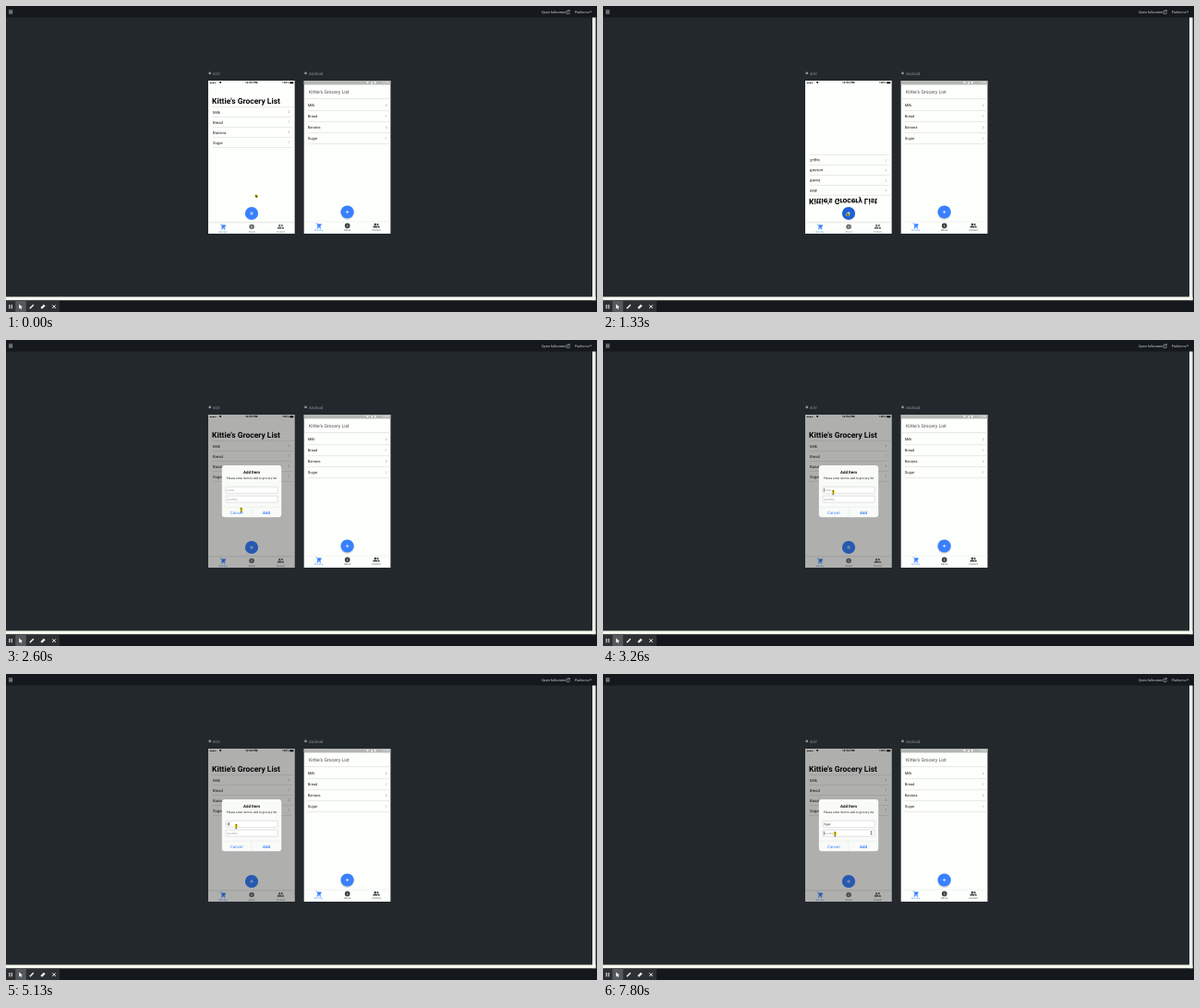
Write an HTML page that moves like this. It is 640 px wide and 332 px high and loops after 8 s.

```html
<!DOCTYPE html>
<html lang="en">
<head>
<meta charset="utf-8">
<title>Grocery list preview</title>
<style>
  html, body { margin: 0; width: 100%; height: 100%; overflow: hidden; background: #23282d; }
  svg { display: block; width: 100vw; height: 100vh; }
  text { font-family: Roboto, "Open Sans", sans-serif; text-rendering: geometricPrecision; }
</style>
</head>
<body>
<svg id="stage" viewBox="0 0 640 332" xmlns="http://www.w3.org/2000/svg">
  <defs>
    <g id="cart">
      <path d="M-3-2.6h1.2l.5 1h4.4l-1.3 2.6h-2.7l-.5.8h4.2" fill="none" stroke="currentColor" stroke-width=".6"/>
      <path d="M-1.4-1.7h4.4l-1.4 2.7h-2.6z" fill="currentColor"/>
      <circle cx="-1.1" cy="2.6" r=".65" fill="currentColor"/>
      <circle cx="1.8" cy="2.6" r=".65" fill="currentColor"/>
    </g>
    <g id="info">
      <circle r="2.8" fill="currentColor"/>
      <path d="M0-.4v1.9M0-1.6v.7" stroke="#fff" stroke-width=".6"/>
    </g>
    <g id="people" fill="currentColor">
      <circle cx="-1.2" cy="-1.4" r="1.2"/><circle cx="1.5" cy="-1.4" r="1.1"/>
      <path d="M-3.6 2.2v-.8q0-1.3 2.4-1.3t2.4 1.3v.8zM1.6 2.2v-1q0-.6-.5-1q2.6-.2 2.6 1.2v.8z"/>
    </g>
  </defs>

  <rect width="640" height="332" fill="#23282d"/>
  <rect width="640" height="12.5" fill="#15191e"/>
  <path d="M3 4.8h4.2M3 6.4h4.2M3 8h4.2" stroke="#d5d8da" stroke-width=".7"/>
  <g id="links" fill="#cdd1d4"></g>
  <g fill="none" stroke="#cdd1d4" stroke-width=".5">
    <path d="M608.4 5.2h-1.4v3.2h3.1v-1.5M608.5 4.6h1.8v1.8M610.2 4.7l-2 2"/>
  </g>
  <path d="M632 5.8h2.2l-1.1 1.2z" fill="#cdd1d4"/>

  <rect x="635" y="12.5" width="3.5" height="307" fill="#f3f6f0"/>
  <rect y="315.5" width="638.5" height="4" fill="#f5f8ee"/>
  <rect x="635.4" y="13" width="2.7" height="300" fill="#e9ece8"/>
  <rect y="319.5" width="640" height="12.5" fill="#14181d"/>
  <rect y="320" width="58" height="12" fill="#2d3033"/>
  <rect x="10.3" y="320" width="11.4" height="12" fill="#575a5c"/>
  <g stroke="#f4f4f4" fill="none" stroke-width="1">
    <path d="M3.8 324v4.4M6.2 324v4.4"/>
    <path d="M25.8 328.2l4-4" stroke-width="1.5"/>
    <path d="M38.2 328l3.6-3.4" stroke-width="2.4"/>
    <path d="M50.2 324.4l3.6 3.6M53.8 324.4l-3.6 3.6"/>
  </g>
  <path d="M14.2 323.4v5l1.2-1 .8 1.7.9-.4-.8-1.7h1.6z" fill="#fff"/>

  <g id="labels" fill="#8b9197">
    <circle cx="220.8" cy="72.9" r="1.4"/>
    <circle cx="324.5" cy="72.9" r="1.4"/>
  </g>

  <g id="droid">
    <rect x="322.7" y="81" width="93.7" height="166" fill="#fdfffc"/>
    <rect x="322.7" y="81" width="93.7" height="4.4" fill="#b4b7b3"/>
    <path d="M390 82.3h3l-1.5 2zM397 82v2.3h-2.4zM399 82h1.3v2.3h-1.3z" fill="#fff"/>
    <path d="M322.7 100.6h93.7" stroke="#d6d8d5" stroke-width=".6"/>
  </g>

  <clipPath id="screen"><rect x="219" y="81" width="93.8" height="166"/></clipPath>
  <g id="phone" clip-path="url(#screen)">
    <rect x="219" y="81" width="93.8" height="166" fill="#fdfffc"/>
    <g id="list"></g>
    <g id="bar">
      <circle cx="221.3" cy="83.3" r=".65"/><circle cx="222.9" cy="83.3" r=".65"/>
      <circle cx="224.5" cy="83.3" r=".65"/><circle cx="226.1" cy="83.3" r=".65"/>
      <circle cx="227.7" cy="83.3" r=".5" fill="#888"/>
      <path d="M230.8 82.6q1.3-1.1 2.6 0l-1.3 1.7z"/>
      <rect x="307.3" y="82.2" width="4" height="2" rx=".4"/>
    </g>
    <path d="M219 234.8h93.8" stroke="#c9cbc8" stroke-width=".5"/>
    <g id="tabs"></g>
    <circle id="fab" cx="266" cy="225" r="7.1" fill="#3880ff"/>
    <path d="M264 225h4M266 223v4" stroke="#fff" stroke-width=".65"/>
    <rect id="shade" x="219" y="81" width="93.8" height="166" fill="#000"/>
    <g id="dialog">
      <rect x="233.8" y="136" width="64.4" height="56.3" rx="3.2" fill="#f9fbf8"/>
      <g fill="#fff" stroke="#c4c6c4" stroke-width=".5">
        <rect x="238" y="159.3" width="56.2" height="7" rx=".8"/>
        <rect x="238" y="169.2" width="56.2" height="7" rx=".8"/>
      </g>
      <path d="M233.8 181.3h64.4M266 181.3v11" stroke="#dcdedb" stroke-width=".4"/>
      <path id="spin" d="M289.5 172.1h2.2l-1.1-1.5zM289.5 173.1h2.2l-1.1 1.5z" fill="#333"/>
      <path id="caret" stroke="#111" stroke-width=".5"/>
    </g>
  </g>

  <g id="cursor">
    <circle r="1.9" cx=".2" cy=".2" fill="#f2e400" opacity=".9"/>
    <path id="arrow" d="M-.8-1.6v3.6l.9-.8.6 1.3.6-.3-.6-1.2h1.2z" fill="#222" stroke="#fff" stroke-width=".2"/>
    <path id="beam" d="M-.8-1.3h1.8M.1-1.3v4.4M-.8 3.1h1.8" stroke="#222" stroke-width=".55" fill="none"/>
  </g>
</svg>
<script>
const LOOP = 8000;
const $ = id => document.getElementById(id);

function add(parent, tag, attrs) {
  const el = document.createElementNS("http://www.w3.org/2000/svg", tag);
  for (const k in attrs) el.setAttribute(k, attrs[k]);
  return $(parent).appendChild(el);
}
function text(parent, str, x, y, size, attrs = {}) {
  const el = add(parent, "text", { x, y, "font-size": size, ...attrs });
  el.textContent = str;
  return el;
}

const middle = { "text-anchor": "middle" };
const title = "Kittie's Grocery List";
const items = [["Milk", 2], ["Bread", 1], ["Banana", 3], ["Sugar", 1]];

text("links", "Open fullscreen", 580, 7.9, 3.75);
text("links", "Platforms", 615.7, 7.9, 3.6);
text("links", "Fennora", 570.2, 327.1, 3.4);
text("links", "Documentation", 584, 327.1, 3.6);
text("links", "Forum", 611, 327.1, 3.6);
text("links", "Tolvix", 624.5, 327.1, 3.6);
text("labels", "nUV", 223.8, 74.8, 4.4);
text("labels", "Android", 328, 74.8, 4.4);

function rows(parent, left, right, top, step, size, end) {
  items.forEach(([name, count], i) => {
    const y = top + i * step;
    text(parent, name, left, y + 1.5, size, { fill: "#222" });
    text(parent, count, right, y + 1.3, 3.4, { fill: "#888", ...middle });
    add(parent, "path", { d: `M${left - .4} ${y + step / 2}H${end}`, stroke: "#d2d4d1", "stroke-width": .5 });
  });
}
function tabs(parent, left, y, labelY, rest) {
  [["cart", "Grocery"], ["info", "About"], ["people", "Contact"]].forEach(([icon, name], i) => {
    const x = left + i * 31.3, color = i ? rest : "#3880ff";
    add(parent, "use", { href: "#" + icon, transform: `translate(${x} ${y})`, color });
    text(parent, name, x, labelY, 2.7, { fill: color, ...middle });
  });
}

text("list", title, 223, 106.1, 8.5, { "font-weight": 700, fill: "#050505" });
add("list", "path", { d: "M222.9 109.6H312.8", stroke: "#d2d4d1", "stroke-width": .5 });
rows("list", 224, 306.5, 115, 11, 4.25, 310);
const clock = text("bar", "", 265.8, 84.4, 3.1, { "font-weight": 700, ...middle });
text("bar", "100%", 306.4, 84.4, 3, { "text-anchor": "end", "font-weight": 500 });
tabs("tabs", 234.8, 239.5, 245.5, "#6b6e70");

text("droid", title, 328, 94.6, 5.15, { fill: "#4a4c4d" });
text("droid", "12:53", 415, 84.3, 2.9, { "text-anchor": "end", fill: "#fff" });
rows("droid", 326.8, 411.6, 107.6, 12, 4.1, 416.4);
add("droid", "path", { d: "M322.7 234H416.4", stroke: "#e3e5e2", "stroke-width": .5 });
tabs("droid", 338.4, 238.4, 243.8, "#3c3f41");
add("droid", "circle", { cx: 369.6, cy: 224.5, r: 7.5, fill: "#000", opacity: .15 });
add("droid", "circle", { cx: 369.6, cy: 223.5, r: 7.1, fill: "#3880ff" });
add("droid", "path", { d: "M367.8 223.5h3.6M369.6 221.7v3.6", stroke: "#fff", "stroke-width": .65 });

text("dialog", "Add Item", 266, 145.1, 4.4, { "font-weight": 700, fill: "#111", ...middle });
text("dialog", "Please enter item to add to grocery list", 266, 150.7, 3.2, { fill: "#222", ...middle });
text("dialog", "Cancel", 249.8, 188.6, 4.4, { fill: "#3880ff", ...middle });
text("dialog", "Add", 282, 188.6, 4.4, { fill: "#3880ff", "font-weight": 700, ...middle });
const nameField = text("dialog", "", 239.5, 163.9, 3.1);
text("dialog", "quantity", 239.5, 173.7, 3.1, { fill: "#999" });

// [time, x, y]
const path = [
  [0, 271, 206], [200, 270.6, 207.5], [860, 265.5, 225], [1060, 265, 226], [1400, 265, 226],
  [1600, 266.5, 225.2], [2100, 266.5, 225.2], [2900, 249.2, 164.6], [6700, 249.2, 164.6],
  [7500, 251.2, 173], [LOOP, 251.2, 173]
];
// [time, typed text]
const typing = [[4930, "E"], [5460, "Eg"], [5660, "Egg"], [5860, "Eggs"]];

const clamp = v => Math.max(0, Math.min(1, v));
const ease = v => v * v * (3 - 2 * v);
const show = (id, on) => $(id).setAttribute("visibility", on ? "inherit" : "hidden");

function pointer(t) {
  const i = path.findIndex(p => p[0] > t), a = path[i - 1], b = path[i];
  const k = ease((t - a[0]) / (b[0] - a[0]));
  return [a[1] + (b[1] - a[1]) * k, a[2] + (b[2] - a[2]) * k];
}

function draw(t) {
  const flipped = t >= 1330 && t < 1400;
  $("list").setAttribute("transform", flipped ? "matrix(1 0 0 -1 0 315)" : "");
  $("fab").setAttribute("fill", t >= 1200 && t < 1750 ? "#1f5fd6" : "#3880ff");
  clock.textContent = t < 3000 ? "12:53 PM" : "12:54 PM";

  const open = ease(clamp((t - 1390) / 210));
  const zoom = 1.1 - .1 * open;
  $("shade").setAttribute("opacity", .31 * open);
  $("dialog").setAttribute("opacity", open);
  $("dialog").setAttribute("transform", `translate(266 164) scale(${zoom}) translate(-266 -164)`);

  const key = typing.filter(k => k[0] <= t).pop();
  const typed = key ? key[1] : "";
  nameField.textContent = typed || "name";
  nameField.setAttribute("fill", typed ? "#222" : "#999");

  const second = t >= 7400;
  const since = second ? 7400 : key ? key[0] : 3200;
  const caretX = 239.4 + (second || !typed ? 0 : nameField.getComputedTextLength() + .4);
  $("caret").setAttribute("d", `M${caretX} ${second ? 170.7 : 160.8}v4`);
  show("caret", t >= 3200 && Math.floor((t - since) / 530) % 2 === 0);

  const [x, y] = pointer(t);
  $("cursor").setAttribute("transform", `translate(${x} ${y})`);
  const overField = t > 2500 && (y < 166.3 || y > 169.2);
  show("beam", overField);
  show("arrow", !overField);
  show("spin", t > 7000 && y > 169.2);
}

function tick(now) {
  draw(now % LOOP);
  requestAnimationFrame(tick);
}
draw(0);
requestAnimationFrame(tick);
</script>
</body>
</html>
```
